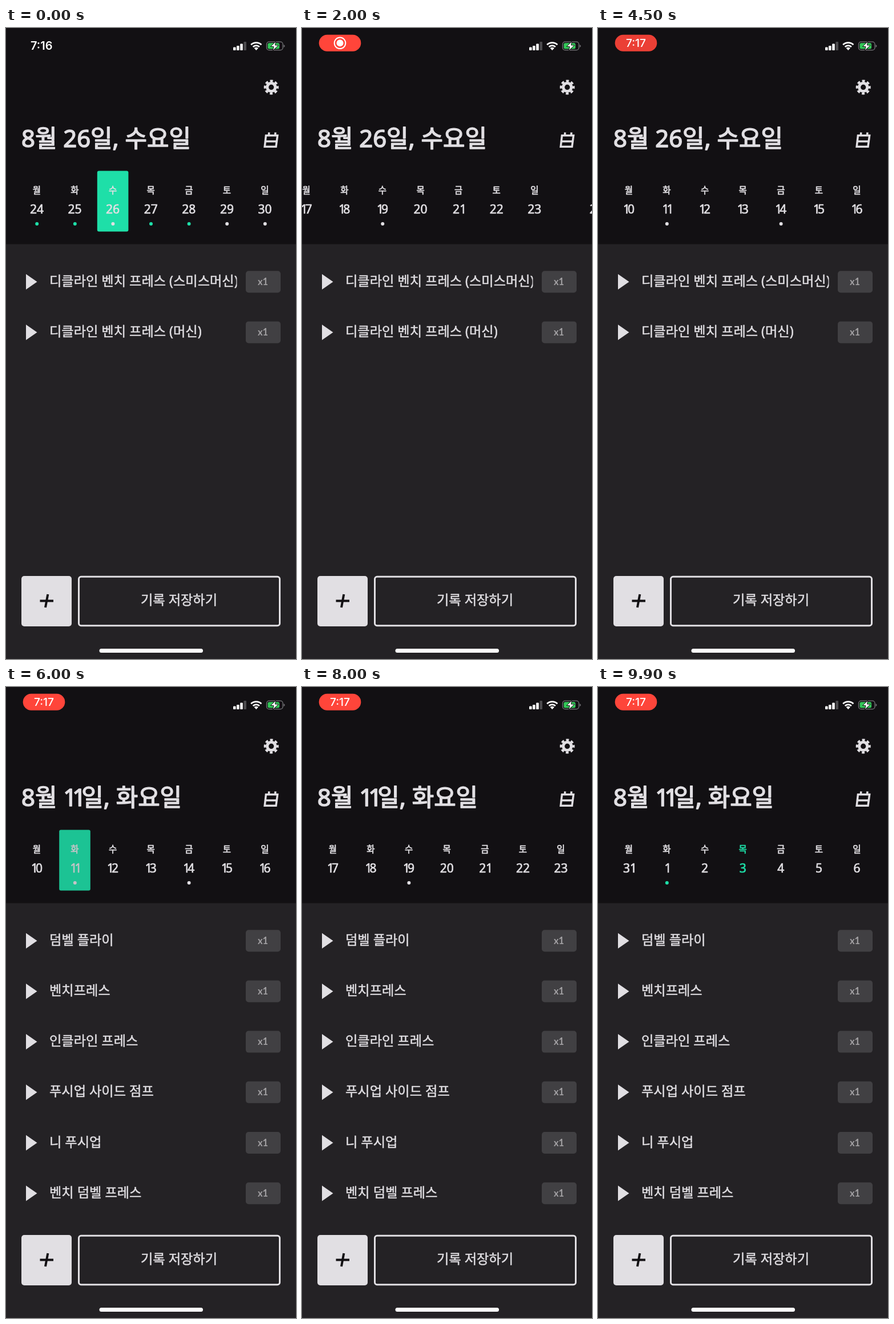
An HTML page for the animation above (10 s loop, 508 px wide and 1102 px high).

```html
<!DOCTYPE html>
<html lang="ko">
<head>
<meta charset="utf-8">
<title>운동 기록</title>
<style>
  html, body { margin: 0; width: 100%; height: 100%; overflow: hidden; background: #242225; }
  svg.stage { display: block; width: 100vw; height: 100vh; }
  /* A thin stroke gives the Korean text its medium weight. */
  text {
    font-family: "Noto Sans", "Noto Sans CJK KR", sans-serif; font-weight: 400;
    fill: #e1dfe3; stroke: #e1dfe3; stroke-linejoin: round;
  }
  .mid { text-anchor: middle; }
  .one { letter-spacing: -.19em; }
  .title { font-size: 41.8px; stroke-width: 1.6px; }
  .name { font-size: 15.5px; stroke-width: .7px; }
  .num { font-size: 21px; stroke-width: .7px; }
  .item { font-size: 23.2px; stroke-width: .5px; }
  .count { font: 700 16.5px Lato, sans-serif; fill: #a3a1a4; stroke: none; }
  .clock { font-family: Inter, sans-serif; font-weight: 600; fill: #fff; stroke: none; }
  .today text { fill: #1edfa8; stroke: #1edfa8; }
</style>
</head>
<body>
<svg class="stage" viewBox="0 0 508 1102" preserveAspectRatio="none">
  <defs><clipPath id="itemClip"><rect x="70" y="400" width="334.5" height="540"/></clipPath></defs>
  <rect width="508" height="1102" fill="#242225"/>
  <rect width="508" height="377.5" fill="#121013"/>

  <text id="plainClock" class="clock" x="43" y="38" font-size="20">7:16</text>
  <g id="pill">
    <rect id="pillBack" x="29.7" y="11.8" width="73.6" height="29" rx="14.5"/>
    <g id="record">
      <circle cx="66.5" cy="26.3" r="9.8" fill="none" stroke="#fff" stroke-width="2"/>
      <circle cx="66.5" cy="26.3" r="6" fill="#fff"/>
    </g>
    <text id="pillClock" class="clock mid" x="66.5" y="33.2" font-size="19.2" style="font-weight:500">7:17</text>
  </g>

  <g fill="#fff">
    <rect x="398" y="33.5" width="4.6" height="5.5" rx="1"/>
    <rect x="404" y="31" width="4.6" height="8" rx="1"/>
    <rect x="410.2" y="27.5" width="4.6" height="11.5" rx="1"/>
    <rect x="416.4" y="24" width="4.6" height="15" rx="1" fill="#4c4b4e"/>
    <path d="M438.3 39l-3.6-3.8a5.2 5.2 0 0 1 7.2 0z"/>
  </g>
  <g fill="none" stroke="#fff" stroke-width="2.8">
    <path d="M432.7 33a8 8 0 0 1 11.2 0"/>
    <path d="M429.2 29.3a13 13 0 0 1 18.2 0"/>
  </g>
  <rect x="456.5" y="24.2" width="28.5" height="14.4" rx="4.3" fill="none" stroke="#77767a" stroke-width="1.3"/>
  <path d="M486.5 29a2.6 2.6 0 0 1 0 5z" fill="#77767a"/>
  <rect x="458.5" y="26.2" width="20.5" height="10.4" rx="2.5" fill="#34c759"/>
  <path d="M472.5 23.5L463.5 32.5H469L467.3 39.5L477.5 30H471.5Z" fill="#fff" stroke="#121013"/>

  <g fill="none" stroke="#e1dfe3">
    <circle cx="464.7" cy="103.4" r="7.1" stroke-width="5"/>
    <circle cx="464.7" cy="103.4" r="11" stroke-width="4" stroke-dasharray="4.9 3.74" stroke-dashoffset="2.45"/>
    <path stroke-width="3.5" d="M455.4 187.8H475.6L473 207.3H453.2ZM454 198H474.5M460.8 182.3L460.2 189M472 182.3L471.4 189"/>
  </g>

  <text id="title" class="title" x="27" y="208"></text>
  <g id="strip"></g>
  <g id="listA"></g>
  <g id="listB"></g>

  <rect x="27" y="957" width="88" height="88" rx="5" fill="#e1dfe3"/>
  <path d="M59.5 1000.5H83M73.3 989L69 1012" stroke="#121013" stroke-width="4" fill="none"/>
  <rect x="127.5" y="958.3" width="352" height="85.4" rx="4" fill="none" stroke="#e1dfe3" stroke-width="3"/>
  <text class="item mid" x="303" y="1007">기록 저장하기</text>
  <rect x="163.5" y="1084" width="181.5" height="7" rx="3.5" fill="#fff"/>
</svg>
<script>
const PAGE = 508, LOOP = 10000, GREEN = '#1edfa8', LIGHT = '#e1dfe3';
const $ = id => document.getElementById(id);
const clamp = v => Math.max(0, Math.min(1, v));
const ramp = (t, from, to) => clamp((t - from) / (to - from));

// The digit 1 is set narrower than the other figures.
const narrow = s => String(s).replace(/1/g, '<tspan class="one">1</tspan>');

const dayNames = [...'월화수목금토일'];
const greenDots = [24, 25, 27, 28, 1], lightDots = [11, 14, 19, 26, 29, 30];

function dayColumn(i) {
  const week = Math.floor(i / 7), x = week * PAGE + 53.9 + (i % 7) * 66.6;
  const day = (i + 9) % 31 + 1;
  const dot = greenDots.includes(day) ? GREEN : lightDots.includes(day) ? LIGHT : 'none';
  return `<g id="day${i}" class="${day === 3 ? 'today' : ''}">
    <rect x="${x - 27.3}" y="249.5" width="54.6" height="106" rx="3" fill="${GREEN}" visibility="hidden"/>
    <text class="name mid" x="${x}" y="288.5">${dayNames[i % 7]}</text>
    <text class="num mid" x="${x}" y="323.7">${narrow(day)}</text>
    <circle cx="${x + .3}" cy="342" r="3" fill="${dot}"/></g>`;
}
$('strip').innerHTML = Array.from({ length: 28 }, (_, i) => dayColumn(i)).join('');

function listRow(label, i) {
  const y = 443.2 + i * 88.2;
  return `<path d="M35 ${y - 13.5}L54.5 ${y}L35 ${y + 13.5}Z" fill="${LIGHT}"/>
    <g clip-path="url(#itemClip)"><text class="item" x="76" y="${y + 6.6}">${label}</text></g>
    <rect x="420" y="${y - 19}" width="61" height="38" rx="5" fill="#414043"/>
    <text class="count mid" x="450" y="${y + 5.5}">x1</text>`;
}
const fillList = (id, labels) => { $(id).innerHTML = labels.map(listRow).join(''); };
fillList('listA', ['디클라인 벤치 프레스 (스미스머신)', '디클라인 벤치 프레스 (머신)']);
fillList('listB', ['덤벨 플라이', '벤치프레스', '인클라인 프레스', '푸시업 사이드 점프', '니 푸시업', '벤치 덤벨 프레스']);

// Each swipe: direction in pages, release time, dragged distance, settling time constant.
const swipes = [
  [-1, 1861, 40, 60],
  [-1, 3200, 42, 28],
  [1, 7011, 40, 60],
  [1, 8200, 38, 29],
  [1, 9260, 40, 60],
];
function swipeDistance(t, release, drag, tau) {
  if (t < release) return drag * ramp(t, release - 100, release) ** 2;
  return PAGE - (PAGE - drag) * Math.exp((release - t) / tau);
}
const scrollAt = t => swipes.reduce(
  (x, [dir, ...swipe]) => x + dir * swipeDistance(t, ...swipe), 2 * PAGE);

const show = (el, on) => el.setAttribute('visibility', on ? 'visible' : 'hidden');
const fade = (el, v) => el.setAttribute('opacity', v);
const FIRST = 16, SECOND = 1;
let shownTitle = '';

function draw(t) {
  const picked = t >= 5900;
  const title = picked ? '8월 11일, 화요일' : '8월 26일, 수요일';
  if (title !== shownTitle) $('title').innerHTML = narrow(shownTitle = title);
  show($('listA'), !picked);
  show($('listB'), picked);
  show($('day' + FIRST).firstElementChild, !picked);
  show($('day' + SECOND).firstElementChild, picked);
  fade($('day' + SECOND), 1 - .8 * ramp(t, 5700, 5800) + .8 * ramp(t, 5850, 6030));
  $('strip').setAttribute('transform', `translate(${-scrollAt(t)} 0)`);

  const recording = ramp(t, 300, 600), clock = ramp(t, 3500, 3800);
  fade($('plainClock'), 1 - recording);
  fade($('pill'), recording);
  fade($('record'), 1 - clock);
  fade($('pillClock'), clock);
  const glow = 1 - .08 * (1 - Math.cos(t * Math.PI / 1000));
  $('pillBack').setAttribute('fill', `rgb(${255 * glow} ${69 * glow} ${58 * glow})`);
}

const start = performance.now();
function tick() {
  // The screen advances ten times a second.
  const t = (performance.now() - start) % LOOP;
  draw(Math.floor(t / 100) * 100);
  requestAnimationFrame(tick);
}
tick();
</script>
</body>
</html>
```
